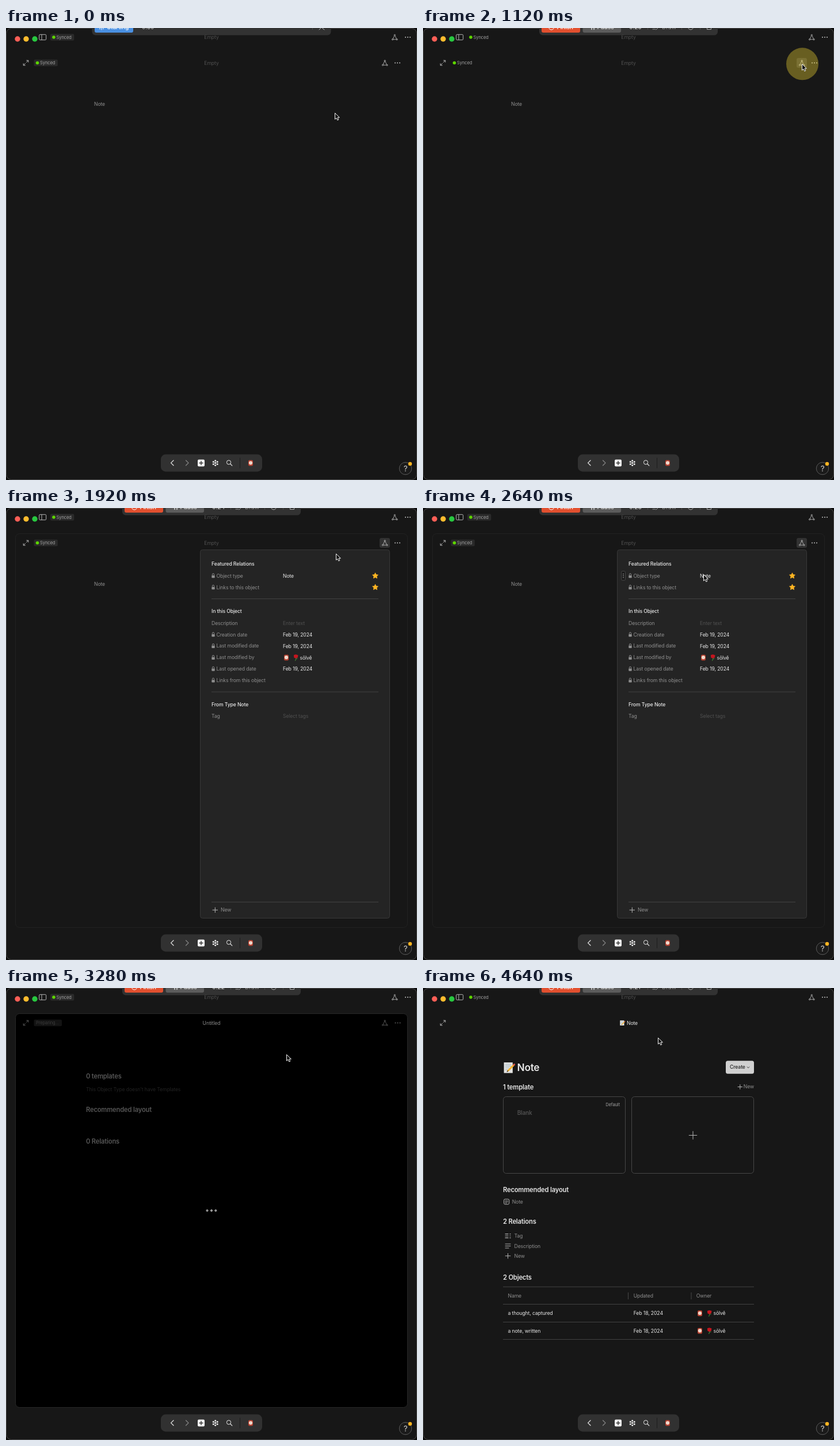
Animation, 714 px wide and 784 px high, one loop 4800 ms. Source, as an HTML page:

```html
<!DOCTYPE html>
<html lang="en">
<head>
<meta charset="utf-8">
<title>Notes window</title>
<style>
html, body { margin: 0; width: 100%; height: 100%; overflow: hidden; background: #0c0c0c; }
svg { display: block; width: 714px; height: 784px; }
text { font-family: Inter, Roboto, sans-serif; letter-spacing: -.014em; white-space: pre; }
</style>
</head>
<body>
<svg id="stage" viewBox="0 0 714 784"></svg>
<script>
const LOOP = 4800, STEP = 80;
const GREY = '#8e8e8e', WHITE = '#e8e8e8', FAINT = '#505050', ICON = '#b4b4b4';
const OWNER = 'sōlvě';

// Shape helpers; text is placed by the vertical centre of its capitals.
const text = (x, y, s, fill = GREY, size = 8.67, weight = 400, anchor = 'start') =>
  `<text x="${x}" y="${y + size * .363}" fill="${fill}" font-size="${size}" font-weight="${weight}" text-anchor="${anchor}">${s}</text>`;
const rect = (x, y, w, h, r, fill, stroke = 'none') =>
  `<rect x="${x}" y="${y}" width="${w}" height="${h}" rx="${r}" fill="${fill}" stroke="${stroke}"/>`;
const dot = (x, y, r, fill, stroke = 'none') =>
  `<circle cx="${x}" cy="${y}" r="${r}" fill="${fill}" stroke="${stroke}"/>`;
const line = (d, stroke = ICON, width = 1) =>
  `<path d="${d}" fill="none" stroke="${stroke}" stroke-width="${width}" stroke-linecap="round" stroke-linejoin="round"/>`;
const rule = (x, y, w, color = '#424242') => rect(x, y, w, 1, 0, color);
const at = (x, y, s, k = 1) => `<g transform="translate(${x} ${y}) scale(${k})">${s}</g>`;
const layer = (id, s) => `<g id="${id}">${s}</g>`;
const heading = (y, s, fill = WHITE) => text(139, y, s, fill, 11.15, 600);

// Icons
const plus = (x, y, r, c = ICON) => line(`M${x - r} ${y}h${2 * r}M${x} ${y - r}v${2 * r}`, c);
const dots = (x, y, c = ICON) => [-4, 0, 4].map(d => dot(x + d, y, 1.05, c)).join('');
const graph = (x, y, c = ICON) => at(x, y,
  line('M-.7 -2.2L-3 2.6M.7 -2.2L3 2.6M-2 3.8H2', c, .9) +
  [[0, -3.6], [-3.7, 3.8], [3.7, 3.8]].map(p => dot(...p, 1.1, 'none', c)).join(''));
const expand = (x, y, c = ICON) => at(x, y,
  line('M1 -1L4.3 -4.3M1.2 -4.3H4.3V-1.2M-1 1L-4.3 4.3M-1.2 4.3H-4.3V1.2', c));
const lock = y => at(360, y,
  rect(-2.7, -.6, 5.4, 4.4, .8, GREY) + line('M-1.6 -.6V-2.2a1.6 1.6 0 0 1 3.2 0V-.6', GREY));
const star = y => {
  const pts = Array.from({ length: 10 }, (_, i) => {
    const r = i % 2 ? 2.6 : 5.2, a = i * Math.PI / 5;
    return `${641.5 + r * Math.sin(a)},${y - r * Math.cos(a)}`;
  });
  return `<polygon points="${pts.join(' ')}" fill="#ffb522" stroke="#ffb522" stroke-width=".8" stroke-linejoin="round"/>`;
};
const avatar = (x, y) => rect(x - 4, y - 5, 8, 10, 2, '#b8402f') + dot(x, y - .3, 3.1, '#f0d9cc');
const rose = (x, y) => at(x, y,
  line('M0 0Q1 3 -1 5M0 2.5l2.5 -1', '#3c7a35', 1.2) + `<path d="M-3.6 -4.4L0 -5.4L4 -4.2L3.2 0L0 1.6L-3.2 0Z" fill="#c4161f"/>`);
const owner = (x, y) => avatar(x, y) + rose(x + 16.5, y) + text(x + 23.5, y, OWNER, WHITE);
const memo = (x, y, k) => at(x, y,
  `<path d="M-8.5 -8.5H6V9H-8.5Z" fill="#e4e4e2"/>` +
  line('M-6 -5.5H3M-6 -2.5H3M-6 .5H0M-6 3.5H-2', '#9db4c4') +
  line('M-1.5 5L7.5 -4', '#f2b230', 3) + line('M-3 6.5L-2 5.5', '#4b3a2a', 1.5) + line('M8 -4.5L8.6 -5', '#d8564c', 3), k);
const synced = (x, y, fill = GREY) =>
  `<g class="badge">${rect(x, y - 5.7, 41.3, 11.4, 2, '#2a2a2a')}</g>` +
  dot(x + 6, y, 2.8, '#5dd400') + text(x + 10.6, y, 'Synced', '#a2a2a2', 7.5);

const base =
  rect(.5, .5, 713, 783, 9, '#171717', '#4a4a4a') +
  ['#ff5f57', '#febc2e', '#28c840'].map((c, i) => dot(20 + 15 * i, 19, 4.7, c)).join('') +
  rect(57.7, 11.3, 12, 9.4, 1.5, 'none', ICON) + line('M62 11.5V20.5') +
  synced(77, 16) + text(357, 16, 'Empty', FAINT, 8.67, 400, 'middle') +
  graph(675.3, 16) + dots(698, 16) +
  rect(269, 739.5, 176, 30, 8.5, '#313131') +
  line('M291 750L286.5 754.4L291 758.8', WHITE, 1.2) + line('M312.5 750L317 754.4L312.5 758.8', '#888', 1.2) +
  rect(333, 748.5, 12, 12, 2, '#f2f2f2') + line('M336 754.5H342M339 751.5V757.5', '#313131', 1.4) +
  dot(363.7, 754.4, 1.6, WHITE) +
  Array.from({ length: 6 }, (_, i) => dot(363.7 + 4 * Math.sin(i * Math.PI / 3), 754.4 - 4 * Math.cos(i * Math.PI / 3), 1.5, WHITE)).join('') +
  dot(387, 753.4, 3.6, 'none', WHITE) + line('M389.8 756.2L392.8 759.2', WHITE, 1.2) +
  rect(406, 745.5, 1, 18, 0, '#1c1c1c') + avatar(425, 754.6) +
  dot(694, 764, 10.7, '#1b1b1b', '#5a5a5a') + text(694, 764.3, '?', '#d0d0d0', 13.5, 400, 'middle') +
  dot(702, 756, 3.2, '#ffb522');

const note =
  layer('frame', rect(16.5, 44.5, 681, 683, 7, 'none', '#222')) +
  expand(34.5, 60.5) + synced(48.5, 60.5) +
  text(357, 60.5, 'Empty', FAINT, 8.67, 400, 'middle') +
  layer('active', rect(649, 52, 18, 17, 3, '#323232')) +
  graph(658.2, 60.5) + dots(680, 60.5) + text(153, 131.8, 'Note');

const fields = [
  [117.5, 'Object type', 'Note'], [137.5, 'Links to this object'],
  [219.5, 'Creation date', 'Feb 19, 2024'], [239.3, 'Last modified date', 'Feb 19, 2024'],
  [259.3, 'Last modified by'], [279, 'Last opened date', 'Feb 19, 2024'],
  [298.8, 'Links from this object']
];
const menu =
  rect(337.5, 72.5, 329, 639, 4, '#242424', '#383838') +
  [[97, 'Featured Relations'], [179.3, 'In this Object'], [340.5, 'From Type Note']]
    .map(([y, s]) => text(357, y, s, WHITE, 8.67, 500)).join('') +
  fields.map(([y, label, value = '']) => lock(y) + text(365.6, y, label) + text(481, y + .3, value, WHITE)).join('') +
  star(117.7) + star(137.5) + owner(487, 259.5) +
  text(357, 200, 'Description') + text(481, 200, 'Enter text', FAINT) +
  text(357, 361.2, 'Tag') + text(481, 361.2, 'Select tags', FAINT) +
  [157, 318.5, 683].map(y => rule(357, y, 290)).join('') +
  plus(363.3, 697.3, 4.3) + text(373, 697.3, 'New') +
  layer('handle', rect(344.5, 109.5, 7, 16, 2, '#1d1d1d', '#444') +
    [-3, 0, 3].map(d => dot(348, 117.5 + d, .8, ICON)).join(''));

const DIM = '#565656';
const loader =
  rect(16.5, 44.5, 681, 683, 7, '#000', '#282828') +
  expand(34.5, 60.5, DIM) + rect(48.5, 54.7, 48.5, 11.6, 2, '#131313') + text(52, 60.5, 'Preparing...', '#3c3c3c', 7.5) +
  text(357, 60.5, 'Untitled', '#888', 8.67, 400, 'middle') + graph(658.2, 60.5, DIM) + dots(680.5, 60.5, DIM) +
  heading(153.3, '0 templates', DIM) + text(139, 176.3, "This Object Type doesn't have Templates", '#222') +
  heading(211.3, 'Recommended layout', DIM) + heading(266.3, '0 Relations', DIM) +
  [349.5, 357, 364.3].map(x => dot(x, 386, 1.5, '#777', '#bbb')).join('');

const row = (y, name) => text(147.5, y, name, WHITE) + text(365.7, y, 'Feb 18, 2024', WHITE) + owner(481, y);
const typePage =
  expand(34.5, 60.5) + memo(346.5, 60.5, .5) + text(354, 60.5, 'Note', WHITE) +
  memo(149.5, 138, 1.05) + text(163.5, 138, 'Note', WHITE, 17.3, 600) +
  rect(526, 126.3, 49, 22.4, 3.5, '#d0d0d0') + text(533, 137.2, 'Create', '#222', 8.67, 500) +
  line('M563 136.8L565 138.6L567 136.8', '#333', .9) +
  heading(171.7, '1 template') + plus(550.8, 171.5, 3.8) + text(575, 171.3, 'New', GREY, 8.67, 400, 'end') +
  rect(139.5, 188.5, 212, 133, 5, 'none', '#474747') + rect(362.5, 188.5, 212, 133, 5, 'none', '#474747') +
  text(342, 201.8, 'Default', '#a0a0a0', 7.5, 400, 'end') + text(163.7, 216.3, 'Blank', FAINT, 9.9, 600) +
  plus(469, 255.5, 6.8) +
  heading(350.3, 'Recommended layout') +
  rect(140.6, 366.2, 9, 9, 2, 'none', ICON) + line('M142.8 369H147.4M142.8 371H147.4M142.8 373H145.5', ICON, .8) +
  text(154.7, 370.5, 'Note') +
  heading(405.3, '2 Relations') +
  line('M143 426.6H148M143 430H148M143 433.4H148M151 426.6h1M151 430h1M151 433.4h1', ICON, 1.2) +
  line('M143 444H152M143 447.5H152M143 451H149') + plus(147.5, 464.7, 4.3) +
  text(158.5, 430, 'Tag') + text(158.5, 447.7, 'Description') + text(158.5, 464.7, 'New') +
  heading(501.7, '2 Objects') +
  [517.8, 548, 579, 609].map(y => rule(139, y, 436)).join('') +
  rect(356, 528, 1, 12, 0, '#484848') + rect(465.5, 528, 1, 12, 0, '#484848') +
  text(147.5, 534, 'Name') + text(365.7, 534, 'Updated') + text(474.7, 534, 'Owner') +
  row(564.3, 'a thought, captured') + row(594.7, 'a note, written');

const separators = xs => xs.map(x => rect(x, -8, 1, 11, 0, '#4c4c4c')).join('');
const startBar =
  rect(149.5, -20, 415, 32.5, 6, '#323232') + rect(154, -20, 67, 28, 3, '#4a90e2') +
  line('M163 -3V2M166 -3V3M169 -3V2', '#fff') + text(175.5, -1.8, 'Starting', '#fff', 10.3, 500) +
  text(236, -1.8, '0:30', '#ccc', 10) + separators([532]) + line('M544 3L548 -1L553 3', '#bbb');
const recordBar =
  rect(202, -20, 310, 32.5, 6, '#323232') + rect(206, -20, 67, 28, 3, '#e2502f') + rect(277.5, -20, 66.5, 28, 3, '#5c5c5c') +
  dot(223, -1.5, 4.6, 'none', '#fff') + text(232.5, -1.8, 'Finish', '#fff', 10.3, 500) +
  line('M293 -4V2.5M297 -4V2.5', '#ddd', 1.4) + text(302.5, -1.8, 'Pause', '#ddd', 10.3, 500) +
  layer('timer', text(358, -2.2, '0:25', '#ddd', 10.5)) + separators([390, 449, 481]) +
  line('M399 2H404M405 3L409 -1', '#999') + text(415, -1.8, 'Draw', '#999', 10.3) +
  dot(465, -1.5, 4.4, 'none', '#aaa') + line('M493.5 -4V2.5H500.5V-4', '#aaa');

const pointer = `<path d="M.5 .5V11.3L3 9L4.8 12.9L6.8 12L5 8.2H8.4Z" fill="#111" stroke="#f4f4f4" stroke-linejoin="round"/>`;

const stage = document.getElementById('stage');
stage.innerHTML = base + layer('note', note) + layer('menu', menu) + layer('loader', loader) +
  layer('typePage', typePage) + layer('startBar', startBar) + layer('recordBar', recordBar) +
  layer('click', dot(659, 62.3, 28, 'rgba(255,227,53,.35)')) + layer('cursor', pointer);

const $ = id => document.getElementById(id);
const badges = stage.querySelectorAll('.badge');
const clock = $('timer').firstChild;
const ticks = [1600, 2480, 3280, 4400];
const path = [
  [0, 571, 147], [480, 571, 147], [560, 574, 141], [800, 625, 95], [960, 653, 66], [1040, 658, 62],
  [1840, 658, 62], [1920, 573, 79], [2000, 540, 93], [2160, 500, 111], [2320, 500, 111],
  [2640, 487, 115], [4480, 487, 115], [4560, 445, 99], [4640, 408, 86], [LOOP, 408, 86]
];

function cursorAt(t) {
  const i = path.findIndex(p => p[0] > t);
  const [a, b] = [path[i - 1], path[i]], k = (t - a[0]) / (b[0] - a[0]);
  return [1, 2].map(j => a[j] + (b[j] - a[j]) * k);
}

function show(el, on) { el.style.display = on ? '' : 'none'; }

function draw(now) {
  const t = Math.floor(now % LOOP / STEP) * STEP;
  const during = (from, to) => t >= from && t < to;
  show($('startBar'), t < 80);
  show($('recordBar'), t >= 80);
  show($('note'), t < 2800);
  show($('frame'), t >= 1200);
  show($('active'), t >= 1040);
  show($('click'), during(1120, 1200));
  show($('menu'), during(1200, 2800));
  $('menu').style.opacity = Math.min(1, (t - 1120) / 240);
  show($('handle'), t >= 2160);
  show($('loader'), during(2800, 3840));
  show($('typePage'), t >= 3840);
  badges.forEach(b => show(b, !during(1120, 1200) && t < 3840));
  clock.textContent = '0:' + (25 - ticks.filter(x => t >= x).length);
  $('cursor').setAttribute('transform', `translate(${cursorAt(t)})`);
}

const start = performance.now();
function frame() {
  draw(performance.now() - start);
  requestAnimationFrame(frame);
}
frame();
</script>
</body>
</html>
```
